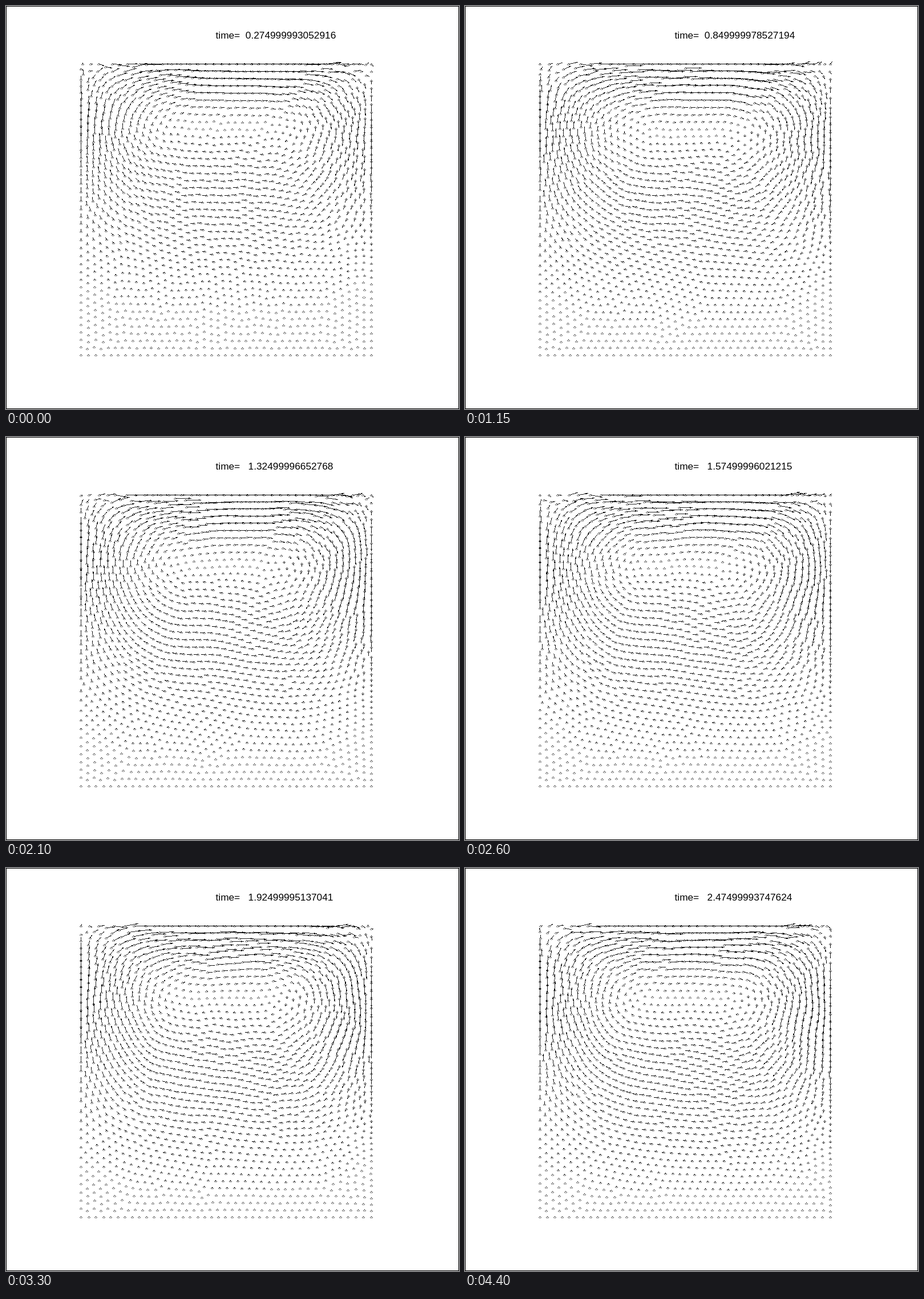
Write an HTML page that moves like this. It is 794 px wide and 705 px high and loops after 4450 ms.

```html
<!DOCTYPE html>
<html lang="en">
<head>
<meta charset="utf-8">
<title>Lid-driven cavity</title>
<style>
  html, body { margin: 0; width: 100%; height: 100%; overflow: hidden; background: #fff; }
  svg { display: block; }
  text { font: 17.27px "Liberation Sans", Arial, sans-serif; white-space: pre; }
  path, rect { shape-rendering: crispEdges; }
</style>
</head>
<body>
<svg width="794" height="705" viewBox="0 0 794 705">
  <rect x=".5" y=".5" width="793" height="704" fill="none" stroke="#000"/>
  <text id="label" x="367.5" y="57"></text>
  <path id="dots" fill="none" stroke="#000" stroke-width=".7"/>
  <path id="stems" fill="none" stroke="#000" stroke-width=".85"/>
  <path id="heads" fill="#000"/>
</svg>
<script>
const STEPS = 89, STEP_MS = 50, WARMUP = 11;
const DT = 0.025, CLOCK_DRIFT = 2.52621253e-8, DRIFT = 0.6;
const SIDE = 41, COUNT = SIDE * SIDE, GAP = 1 / (SIDE - 1);
const LEFT = 131, TOP = 101, SIZE = 509, ARROW = 31;
const REACH = 1.5 * GAP, CELLS = Math.ceil(1 / REACH) + 3;
const MIRROR = 1.08 * GAP;

const byId = id => document.getElementById(id);
const label = byId('label'), dots = byId('dots'), stems = byId('stems'), heads = byId('heads');
const clamp = v => Math.min(1, Math.max(0, v));

function random(seed) {
  return () => {
    seed = (seed + 0x6D2B79F5) | 0;
    let r = Math.imul(seed ^ (seed >>> 15), 1 | seed);
    r = (r + Math.imul(r ^ (r >>> 7), 61 | r)) ^ r;
    return ((r ^ (r >>> 14)) >>> 0) / 4294967296;
  };
}

// Velocity of the vortex under the lid; y is the depth below it.
function velocity(x, y, time) {
  const n = 2.9 + 0.9 * Math.exp(-1.3 * time);
  const a = Math.PI * x;
  const across = 1.14 * (Math.sin(a) + 0.12 * Math.sin(3 * a));
  const slope = 1.14 * Math.PI * (Math.cos(a) + 0.36 * Math.cos(3 * a));
  const rest = 1 - y, decay = Math.pow(rest, n - 1);
  return [across * decay * (rest - n * y), -slope * y * decay * rest];
}

// The coordinate itself and its reflection if a wall is near.
function reflections(v) {
  const near = REACH - MIRROR;
  if (v < near) return [v, -v - MIRROR];
  if (v > 1 - near) return [v, 2 - v + MIRROR];
  return [v];
}

// Neighbours and wall reflections push particles apart so that the spacing stays even.
function relax(xs, ys) {
  const cells = Array.from({ length: CELLS * CELLS }, () => []);
  const cell = v => Math.floor(v / REACH) + 1;
  for (let i = 0; i < COUNT; i++) {
    for (const y of reflections(ys[i])) {
      for (const x of reflections(xs[i])) cells[cell(y) * CELLS + cell(x)].push([x, y]);
    }
  }
  const pushed = Array.from(xs, (x, i) => {
    const y = ys[i], cx = cell(x), cy = cell(y);
    let dx = 0, dy = 0;
    for (let r = Math.max(0, cy - 1); r <= Math.min(CELLS - 1, cy + 1); r++) {
      for (let c = Math.max(0, cx - 1); c <= Math.min(CELLS - 1, cx + 1); c++) {
        for (const [ox, oy] of cells[r * CELLS + c]) {
          const ex = x - ox, ey = y - oy, dist = Math.sqrt(ex * ex + ey * ey);
          if (dist >= REACH || dist < 1e-9) continue;
          const w = 1 - dist / REACH, push = 0.45 * GAP * w * w / dist;
          dx += ex * push;
          dy += ey * push;
        }
      }
    }
    return [clamp(x + dx), clamp(y + dy)];
  });
  pushed.forEach(([x, y], i) => { xs[i] = x; ys[i] = y; });
}

function simulate() {
  const rand = random(7), states = [];
  const xs = new Float64Array(COUNT), ys = new Float64Array(COUNT);
  const place = k => clamp(k * GAP + (k % (SIDE - 1) ? (rand() - 0.5) * 0.6 * GAP : 0));
  for (let i = 0; i < COUNT; i++) {
    xs[i] = place(i % SIDE);
    ys[i] = place(Math.floor(i / SIDE));
  }
  for (let k = 0; k < 20; k++) relax(xs, ys);
  for (let n = 1; n < WARMUP + STEPS; n++) {
    const time = n * DT, move = DT * DRIFT;
    for (let i = 0; i < COUNT; i++) {
      const [u, v] = velocity(xs[i], ys[i], time);
      const mid = velocity(clamp(xs[i] + u * move / 2), clamp(ys[i] + v * move / 2), time);
      xs[i] = clamp(xs[i] + mid[0] * move);
      ys[i] = clamp(ys[i] + mid[1] * move);
    }
    for (let k = 0; k < 5; k++) relax(xs, ys);
    if (n >= WARMUP) states.push([xs.slice(), ys.slice()]);
  }
  return states;
}

const states = simulate();

function draw(step) {
  const [xs, ys] = states[step];
  const time = (WARMUP + step) * DT;
  const rand = random(100 + step);
  const at = (px, py) => `${px.toFixed(1)} ${py.toFixed(1)}`;
  let dotPath = '', stemPath = '', headPath = '';
  for (let i = 0; i < COUNT; i++) {
    const x = Math.round(LEFT + xs[i] * SIZE) + 0.5;
    const y = Math.round(TOP + ys[i] * SIZE) + 0.5;
    dotPath += `M${x - 2} ${y}l2-2 2 2-2 2z`;

    let [u, v] = velocity(xs[i], ys[i], time);
    // The flow is unsteady in the two corners at the lid.
    if (ys[i] < 0.04 && Math.abs(xs[i] - 0.5) > 0.32) {
      u += (rand() - 0.4) * 0.2;
      v += (rand() - 0.55) * 0.3;
    }
    const speed = Math.hypot(u, v), length = speed * ARROW;
    if (length < 0.8) continue;
    const ax = u / speed, ay = v / speed;
    const tipX = x + ax * length, tipY = y + ay * length;
    const head = Math.min(4.5, 0.6 + length * 0.25), half = head * 0.3;
    const baseX = tipX - ax * head, baseY = tipY - ay * head;
    stemPath += `M${x} ${y}L${at(tipX, tipY)}`;
    headPath += `M${at(tipX, tipY)}L${at(baseX - ay * half, baseY + ax * half)}`
      + `L${at(baseX + ay * half, baseY - ax * half)}z`;
  }
  dots.setAttribute('d', dotPath);
  stems.setAttribute('d', stemPath);
  heads.setAttribute('d', headPath);
  const value = Number((time * (1 - CLOCK_DRIFT)).toPrecision(15));
  label.textContent = 'time=' + String(value).padStart(19);
}

let start, shown = 0;
function tick(now) {
  start ??= now;
  const step = Math.floor((now - start) / STEP_MS) % STEPS;
  if (step !== shown) draw(shown = step);
  requestAnimationFrame(tick);
}
draw(0);
requestAnimationFrame(tick);
</script>
</body>
</html>
```
